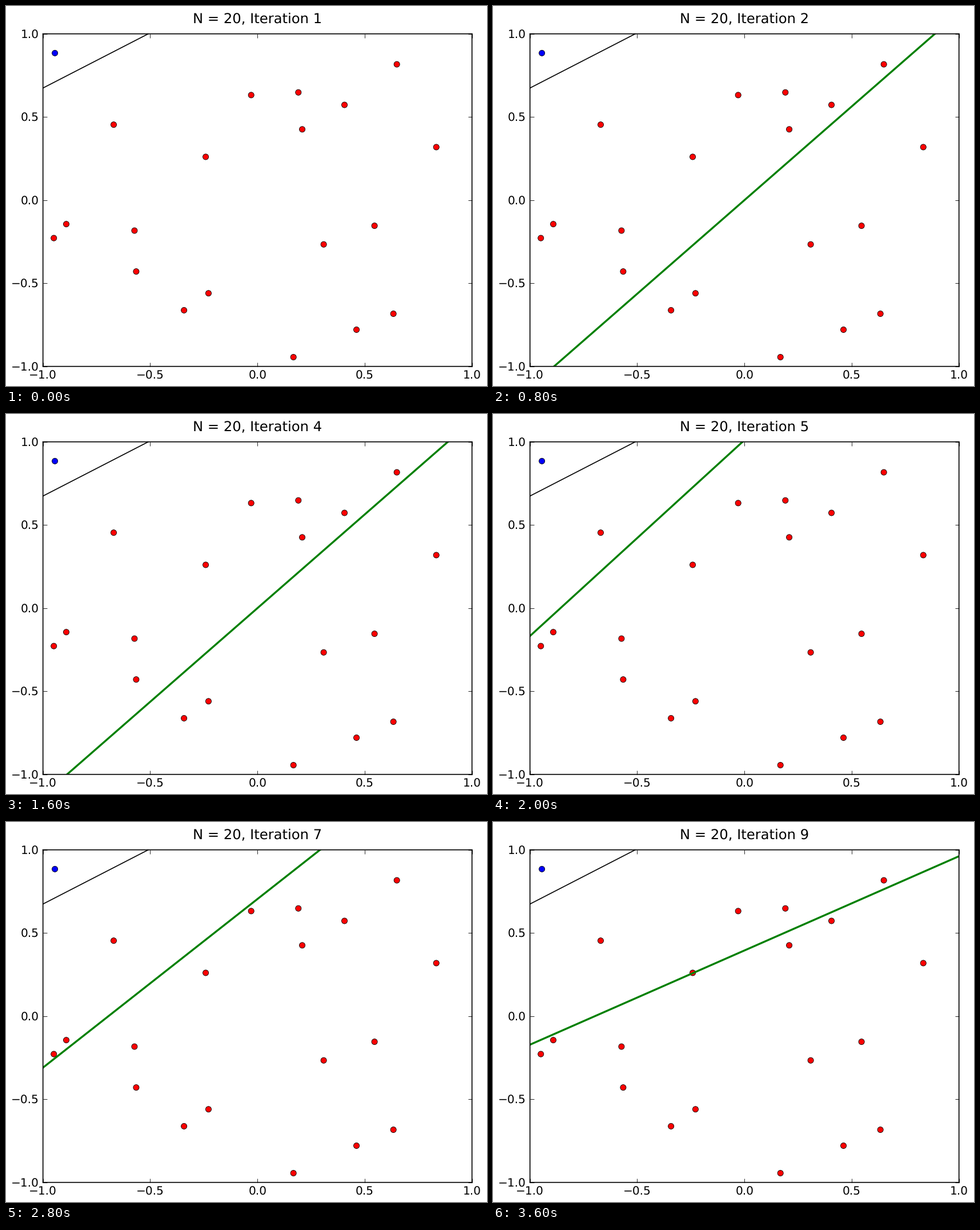
A matplotlib script that plays this animation: 842x665 px, repeating every 4000 ms.

```python
import numpy as np
import matplotlib.pyplot as plt
from matplotlib.animation import FuncAnimation
from matplotlib.transforms import ScaledTranslation

W, H, DPI = 842, 665, 128
K = 121.1 / DPI  # point scale
LEFT, RIGHT, TOP, BOTTOM = 64.7, 815.7, 48.7, 630.7
STEPS = 10

plt.rcParams.update({
    "font.family": "DejaVu Sans",
    "font.size": 12 * K,
    "text.hinting": "none",
    "axes.linewidth": K,
})

# The sample being classified; only the last point is positive
POINTS = np.array([
    (-.240, .2585), (-.948, -.230), (-.028, .630), (-.669, .452),
    (.192, .646), (.407, .571), (.210, .424), (.651, .815), (.835, .317),
    (-.890, -.146), (-.572, -.185), (-.564, -.431), (-.227, -.562),
    (-.341, -.664), (.169, -.946), (.463, -.781), (.635, -.685),
    (.547, -.156), (.310, -.268), (-.943, .8825),
])
LABELS = np.array([-1] * (len(POINTS) - 1) + [1])


def train(steps):
    """Perceptron: each step adds the first misclassified point."""
    signed = LABELS[:, None] * np.column_stack([np.ones(len(POINTS)), POINTS])
    w = np.zeros(3)
    history = []
    for _ in range(steps):
        wrong = signed @ w <= 0
        w = w + signed[np.argmax(wrong)]
        history.append(w)
    return history


weights = train(STEPS)
order = sorted(range(1, STEPS + 1), key=str)  # 1, 10, 2, 3, ...

fig = plt.figure(figsize=(W / DPI, H / DPI), dpi=DPI, facecolor="white")
ax = fig.add_axes([LEFT / W, 1 - BOTTOM / H,
                   (RIGHT - LEFT) / W, (BOTTOM - TOP) / H])
ticks = np.linspace(-1, 1, 5)
ax.set(xlim=(-1, 1), ylim=(-1, 1), xticks=ticks, yticks=ticks)
ax.tick_params(direction="in", top=True, right=True,
               length=4 * K, width=0.5 * K, pad=4 * K)
for spine in ax.spines.values():
    spine.set_snap(False)

xs = np.array([-3, 3])
ax.plot([-1, -0.509], [0.674, 1], color="black", lw=K)

# Dots sit half a pixel up and left of the grid
nudge = ScaledTranslation(-0.5 / DPI, 0.5 / DPI, fig.dpi_scale_trans)
ax.scatter(*POINTS.T, s=(6 * K) ** 2, c=np.where(LABELS > 0, "blue", "red"),
           edgecolors="black", linewidths=0.5 * K,
           transform=ax.transData + nudge)

guess, = ax.plot([], [], color=(0, 0.5, 0), lw=2 * K)
title = fig.text((LEFT + RIGHT) / 2 / W, 1 - 30.5 / H, "", ha="center",
                 va="baseline", fontsize=14.4 * K)


def draw(i):
    n = order[i]
    b, wx, wy = weights[n - 1]
    guess.set_data(xs, -(b + wx * xs) / wy)
    title.set_text(f"N = 20, Iteration {n}")
    return guess, title


anim = FuncAnimation(fig, draw, frames=STEPS, interval=400,
                     repeat=True, repeat_delay=0)
plt.show()
```
